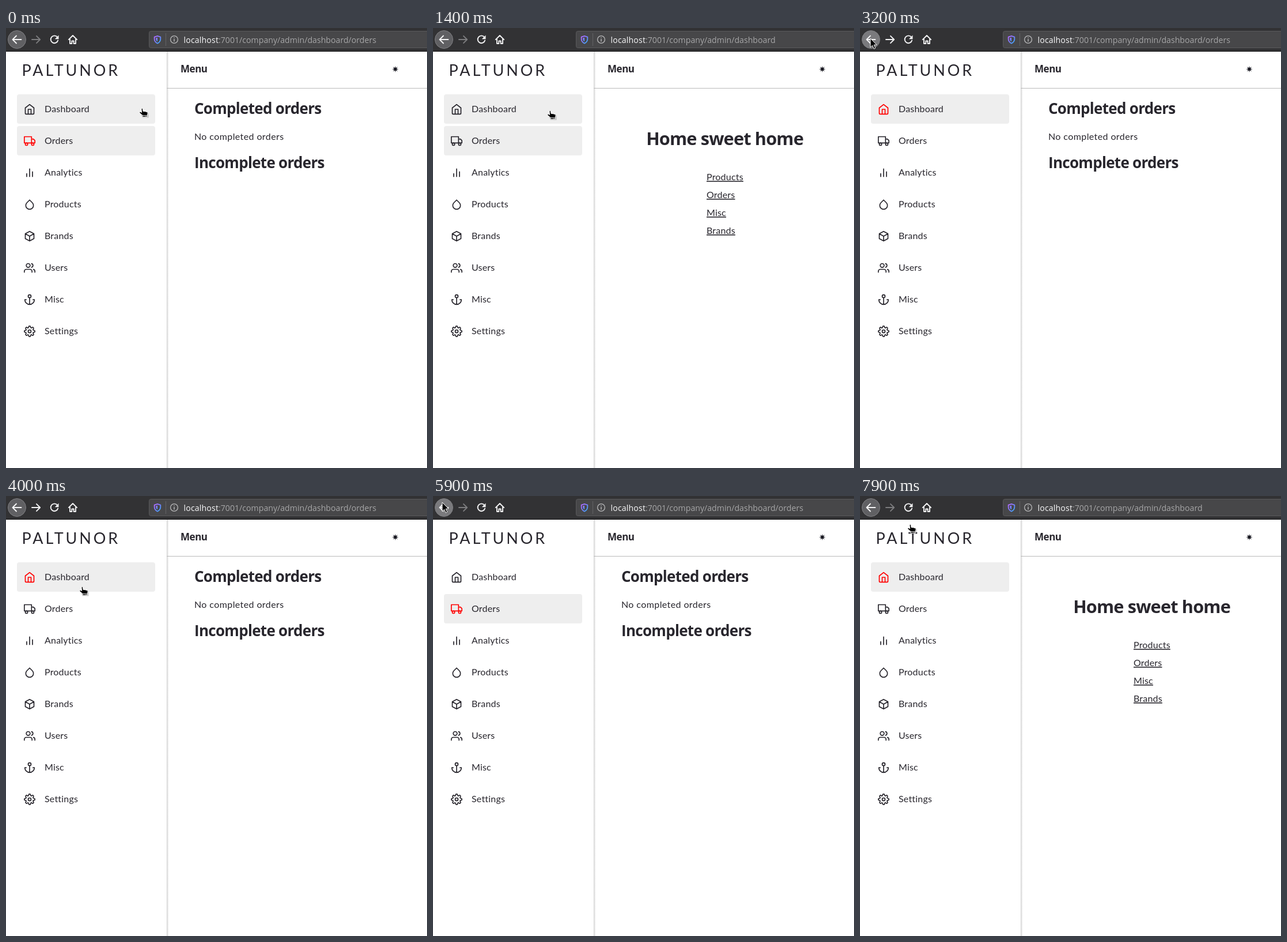
Recreate the animation shown at these times as an HTML page. Size 731 px wide and 763 px high, loop 8 s.

```html
<!DOCTYPE html>
<html lang="en">
<head>
<meta charset="utf-8">
<title>Admin dashboard</title>
<style>
  html, body { margin: 0; width: 100%; height: 100%; overflow: hidden; background: #fff; }
  svg { display: block; }
  text { fill: #28262d; white-space: pre; }
  .body { font: 16px Lato, sans-serif; letter-spacing: .2px; }
  .head { font-family: "Open Sans", sans-serif; font-weight: 700; letter-spacing: -.027em; }
  .url { font: 14.15px "Open Sans", sans-serif; }
  .logo { font: 27px Lato, sans-serif; letter-spacing: 3.9px; }
  .link { text-decoration: underline 1px; text-underline-offset: 1px; }
  .line { fill: none; stroke-width: 2; stroke-linecap: round; stroke-linejoin: round; }
  .tool { fill: none; stroke: #f4f4f5; stroke-width: 1.9; stroke-linecap: round; stroke-linejoin: round; }
</style>
</head>
<body>
<svg width="731" height="763" viewBox="0 0 731 763">
  <defs>
    <linearGradient id="edge">
      <stop offset="0" stop-color="#c9c9c9"/>
      <stop offset=".35" stop-color="#e6e6e6"/>
      <stop offset="1" stop-color="#fff"/>
    </linearGradient>
    <linearGradient id="tint" x1="0" y1="0" x2="1" y2="1">
      <stop offset="0" stop-color="#b66bff"/>
      <stop offset=".5" stop-color="#7a7dff"/>
      <stop offset="1" stop-color="#2fb4ff"/>
    </linearGradient>
  </defs>
  <rect width="731" height="763" fill="#fff"/>

  <rect x="279" y="41" width="4" height="722" fill="url(#edge)"/>
  <rect x="279" y="104" width="452" height="1" fill="#b9b9b9"/>
  <text class="logo" x="27.5" y="83">PALTUNOR</text>
  <g id="nav"></g>

  <text class="head" font-size="17" x="303" y="77">Menu</text>
  <path id="star" fill="#16161f"/>

  <g id="orders">
    <text class="head" font-size="26" x="327" y="149">Completed orders</text>
    <text class="body" style="letter-spacing:.4px" x="327" y="194">No completed orders</text>
    <text class="head" font-size="26" x="327" y="243">Incomplete orders</text>
  </g>
  <g id="home">
    <text class="head" font-size="30.7" x="370.2" y="203">Home sweet home</text>
    <g id="links"></g>
  </g>

  <rect width="731" height="40" fill="#323234"/>
  <rect y="40" width="731" height="1" fill="#0f0f10"/>
  <circle id="back" cx="19" cy="20" r="15.5" stroke="#808083"/>
  <path class="tool" d="M26.5 20H12M18 13.5L11.5 20L18 26.5"/>
  <path class="tool" id="fwd" d="M45 20H59M53 13.8L59.2 20L53 26.2"/>
  <path class="tool" d="M89.2 16A6.4 6.4 0 1 0 90.2 21.5"/>
  <path d="M91.5 12.5V19.2H84.8Z" fill="#f4f4f5"/>
  <path class="tool" d="M108.8 20.2L116 13L123.2 20.2M111 19.5V27H114.3V22.5H117.7V27H121V19.5"/>
  <rect x="248.5" y="5.5" width="500" height="29" rx="3" fill="#474749" stroke="#59595b"/>
  <rect x="277" y="9" width="1" height="22" fill="#626264"/>
  <path d="M263 13.8L268.3 15.6V19.5Q268 24.3 263 26.6Q258 24.3 257.7 19.5V15.6Z" fill="none" stroke="url(#tint)" stroke-width="1.8" stroke-linejoin="round"/>
  <path d="M263 16.6V23.6Q260.4 22 260.3 19.2V17.5Z" fill="url(#tint)"/>
  <circle cx="292" cy="20" r="6.4" fill="none" stroke="#b9b9ba" stroke-width="1.3"/>
  <path d="M292 19V23.6M292 16.2V17.4" stroke="#b9b9ba" stroke-width="1.5"/>
  <text class="url" style="fill:#f9f9fa;letter-spacing:.15px" x="308.5" y="25.5">localhost</text>
  <text class="url" style="fill:#a6a6a7" id="path" x="369" y="25.5"></text>

  <g id="arrow">
    <path d="M1 1V17L5 13.5L7.6 19.5L10.4 18.3L7.8 12.5H13Z" fill="#000" opacity=".18"/>
    <path d="M0 0V15.6L3.6 12.2L6.2 18.2L8.8 17L6.2 11.2H11Z" fill="#000" stroke="#fff"/>
  </g>
  <g id="hand">
    <g transform="translate(-7 -2)">
      <path d="M3 9H17.5V17.6H7Z" fill="#000" opacity=".22"/>
      <path d="M5 3Q5 1.3 6.3 1.3Q7.6 1.3 7.7 3L8.1 6.4L10 6.5L12.5 6.9L15 7.6Q16.2 8.2 16.1 10L15.5 13.4V16.3H6.8V13.2L2.4 9.6Q1.3 8.3 2.4 7.5Q3.5 6.9 5.7 8.6Z" fill="#000" stroke="#fff"/>
      <path d="M7 13.8H15.4M12.6 15.2H14" stroke="#fff"/>
    </g>
  </g>
</svg>
<script>
const $ = id => document.getElementById(id);
const path = d => `<path d="${d}"/>`;
const circle = (x, y, r) => `<circle cx="${x}" cy="${y}" r="${r}"/>`;

// A quarter of the cog outline, turned four times.
const cog = 'M19.4 15a1.65 1.65 0 0 0 .33 1.82l.06.06a2 2 0 0 1-2.83 2.83l-.06-.06a1.65 1.65 0 0 0-1.82-.33' +
  'a1.65 1.65 0 0 0-1 1.51V21a2 2 0 0 1-4 0v-.09A1.65 1.65 0 0 0 9 19.4';
const gear = [0, 90, 180, 270]
  .map(a => `<path d="${cog}" transform="rotate(${a} 12 12)"/>`).join('');

const items = [
  ['Dashboard', path('M3 9l9-7 9 7v11a2 2 0 0 1-2 2H5a2 2 0 0 1-2-2zM9 22V12h6v10')],
  ['Orders', path('M1 3h15v13H1zM16 8h4l3 3v5h-7z') + circle(5.5, 18.5, 2.5) + circle(18.5, 18.5, 2.5)],
  ['Analytics', path('M18 20V10M12 20V4M6 20v-6')],
  ['Products', path('M12 2.7l5.66 5.66a8 8 0 1 1-11.32 0z')],
  ['Brands', path('M12 2l9 5v10l-9 5-9-5V7zM3 7l9 5 9-5M12 12v10')],
  ['Users', path('M17 21v-2a4 4 0 0 0-4-4H5a4 4 0 0 0-4 4v2M23 21v-2a4 4 0 0 0-3-3.87M16 3.13a4 4 0 0 1 0 7.75') + circle(9, 7, 4)],
  ['Misc', path('M12 22V8M5 12H2a10 10 0 0 0 20 0h-3') + circle(12, 5, 3)],
  ['Settings', gear + circle(12, 12, 3)]
];

const rowTop = i => 115 + 55 * i;

$('nav').innerHTML = items.map(([name, icon], i) => {
  const y = rowTop(i);
  return `<rect id="bg${i}" x="19" y="${y}" width="240" height="51" rx="4" fill="#eee" opacity="0"/>
    <g id="icon${i}" class="line" stroke="#25232a" transform="translate(31 ${y + 16}) scale(.8333)">${icon}</g>
    <text class="body" x="67" y="${y + 31}">${name}</text>`;
}).join('');

$('links').innerHTML = ['Products', 'Orders', 'Misc', 'Brands']
  .map((s, i) => `<text class="body link" x="475" y="${264 + 31 * i}">${s}</text>`).join('');

$('star').setAttribute('d', 'M' + Array.from({ length: 16 }, (_, i) => {
  const a = i * Math.PI / 8, r = i % 2 ? 2.3 : 5.6;
  return (676 + r * Math.sin(a)).toFixed(2) + ' ' + (71.3 - r * Math.cos(a)).toFixed(2);
}).join('L') + 'Z');

const LOOP = 8000, STEP = 100, FADE = 300;
const toHome = 1400, goBack = 3100, toOrders = 4800, backAgain = 6500, homeAgain = 7600;

// Each move: start, length, end point.
const rest = { x: 237, y: 140 };
const moves = [
  [700, 300, 204, 144], [2000, 400, -3, 43], [2400, 200, 19, 3], [2700, 200, 18, 18],
  [3600, 400, 133, 158], [4000, 400, 152, 213], [4500, 200, 159, 192],
  [5200, 700, 16, 11], [6600, 400, 141, 155], [7600, 300, 88, 50]
];

const clamp = u => Math.max(0, Math.min(1, u));
const ease = u => u * u * (3 - 2 * u);
const mix = (a, b, u) => a + (b - a) * u;
const within = (t, a, b) => t >= a && t < b;

function mouse(t) {
  return moves.reduce((p, [start, length, x, y]) => {
    const u = ease(clamp((t - start) / length));
    return { x: mix(p.x, x, u), y: mix(p.y, y, u) };
  }, rest);
}

// The marked row changes on clicks, but not on the browser's back button.
function marked(t) {
  const since = [homeAgain, toOrders, toHome].find(c => t >= c) ?? -FADE;
  const row = since === toHome || since === homeAgain ? 0 : 1;
  return { row, glow: clamp((t - since) / FADE) };
}

function lit(i, t) {
  const { x, y } = mouse(t);
  const hover = within(x, 19, 259) && within(y, rowTop(i), rowTop(i) + 51);
  return hover || marked(t).row === i;
}

// Row backgrounds trail their state a little.
const shade = (i, t) => (lit(i, t - STEP) + lit(i, t - 2 * STEP)) / 2;

const show = (id, on) => $(id).setAttribute('visibility', on ? 'visible' : 'hidden');

function draw(ms) {
  const t = Math.floor(ms % LOOP / STEP) * STEP;
  const home = within(t, toHome, goBack) || t >= homeAgain;
  show('home', home);
  show('orders', !home);
  $('path').textContent = ':7001/company/admin/dashboard' + (home ? '' : '/orders');

  const canGo = within(t, goBack, toOrders) || within(t, backAgain, homeAgain);
  $('fwd').style.stroke = canGo ? '#f4f4f5' : '#7c7c7e';

  const { row, glow } = marked(t);
  for (const i of [0, 1]) {
    const g = row === i ? glow : 0;
    $('bg' + i).setAttribute('opacity', shade(i, t));
    $('icon' + i).setAttribute('stroke', `rgb(${mix(37, 255, g)},${mix(35, 0, g)},${mix(42, 0, g)})`);
  }

  const { x, y } = mouse(t);
  const hand = within(x, 19, 259) && (within(y, 46, 98) || y >= 115);
  show('hand', hand);
  show('arrow', !hand);
  $(hand ? 'hand' : 'arrow').setAttribute('transform', `translate(${Math.round(x)} ${Math.round(y)})`);
  $('back').setAttribute('fill', x < 36 && y < 40 ? '#7a7a7d' : '#606063');
}

const start = performance.now();
function tick() {
  draw(performance.now() - start);
  requestAnimationFrame(tick);
}
tick();
</script>
</body>
</html>
```
